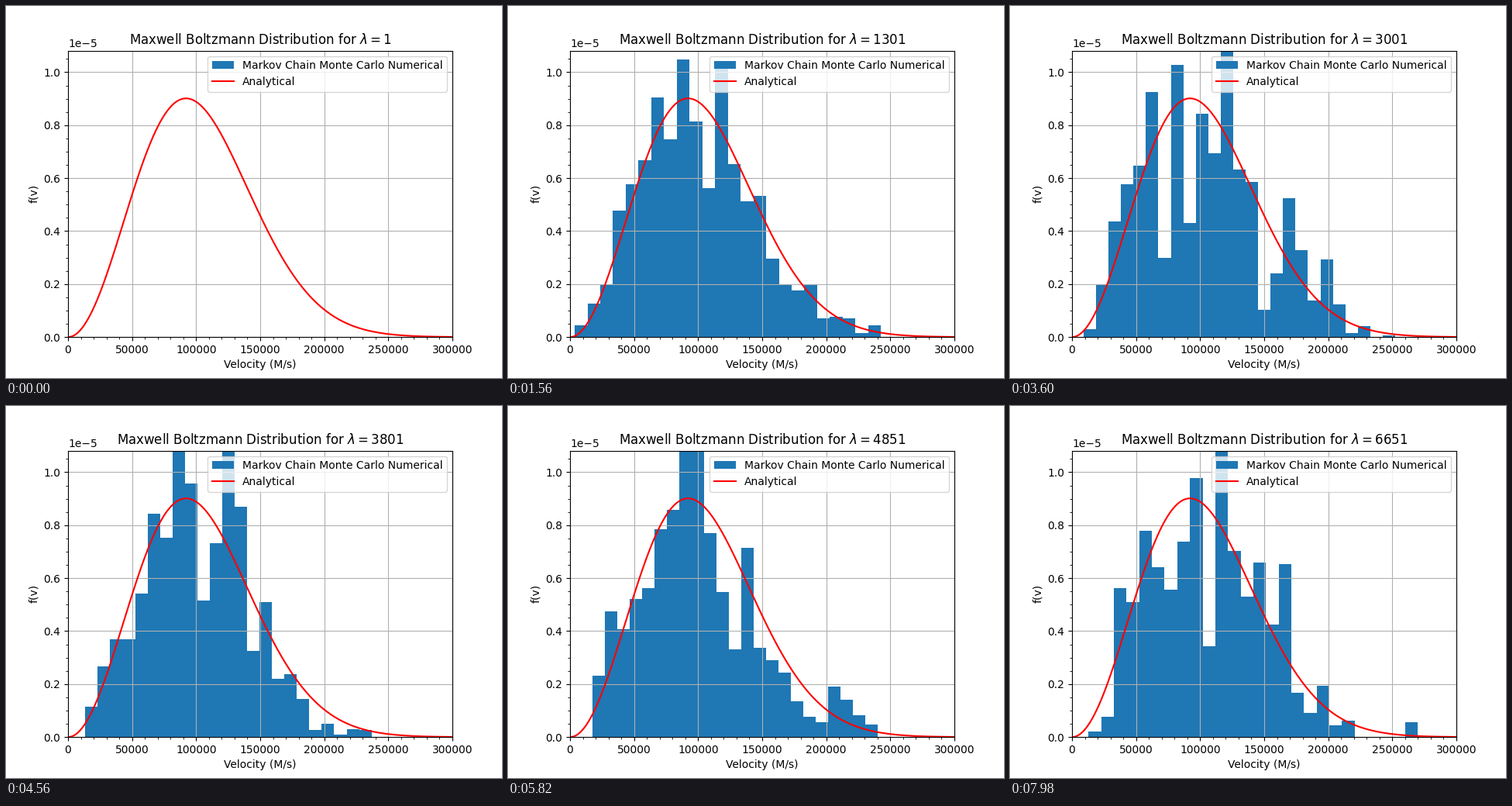
Recreate the animation shown at these times as a matplotlib script. Size 640x480 px, loop 8 s.

```python
import math
import random

import numpy as np
import matplotlib.pyplot as plt
from matplotlib.animation import FuncAnimation
from matplotlib.patches import Patch

LOOP_MS = 8000
FRAMES = 134
LAMBDA_STEP = 50

# Electron gas at 280 K
BOLTZMANN = 1.380649e-23
MASS = 9.1093837e-31
TEMPERATURE = 280
SCALE = math.sqrt(BOLTZMANN * TEMPERATURE / MASS)

V_MAX = 300000
BIN = 10000
SAMPLES = 2000
STRIDE = 150         # proposal half-width per unit of lambda


def maxwell(v):
    return math.sqrt(2 / math.pi) * v**2 / SCALE**3 * np.exp(-v**2 / (2 * SCALE**2))


def metropolis(lam):
    """Random-walk chain on the speed distribution, seeded by its step size."""
    rng = random.Random(lam)
    reach = STRIDE * lam
    v = math.sqrt(2) * SCALE
    chain = []
    for _ in range(SAMPLES):
        w = v + rng.uniform(-reach, reach)
        if w > 0:
            gain = 2 * math.log(w / v) - (w * w - v * v) / (2 * SCALE**2)
            if gain >= 0 or rng.random() < math.exp(gain):
                v = w
        chain.append(v)
    return chain


def histogram(chain):
    span = max(chain) - min(chain)
    if span < BIN:      # too narrow to fill a single bin
        return np.zeros(1), np.array([0, BIN])
    return np.histogram(chain, bins=math.ceil(span / BIN), density=True)


fig, ax = plt.subplots(figsize=(6.4, 4.8), dpi=100)
speeds = np.linspace(0, V_MAX, 1000)
curve = maxwell(speeds)

bars = ax.stairs([0], [0, BIN], fill=True, color="C0")
line, = ax.plot(speeds, curve, color="red", label="Analytical")
ax.set_xlim(0, V_MAX)
ax.set_ylim(0, 1.2 * curve.max())
ax.set_xlabel("Velocity (M/s)")
ax.set_ylabel("f(v)")
ax.minorticks_on()
ax.grid(True)
title = ax.set_title("")
ax.legend(handles=[Patch(color="C0", lw=0, label="Markov Chain Monte Carlo Numerical"), line],
          loc="upper right")


def update(i):
    lam = 1 + LAMBDA_STEP * i
    bars.set_data(*histogram(metropolis(lam)))
    title.set_text(rf"Maxwell Boltzmann Distribution for $\lambda = {lam}$")
    return bars, title


anim = FuncAnimation(fig, update, frames=FRAMES, init_func=lambda: update(0),
                     interval=LOOP_MS / FRAMES, repeat=True, repeat_delay=0)
plt.show()
```
